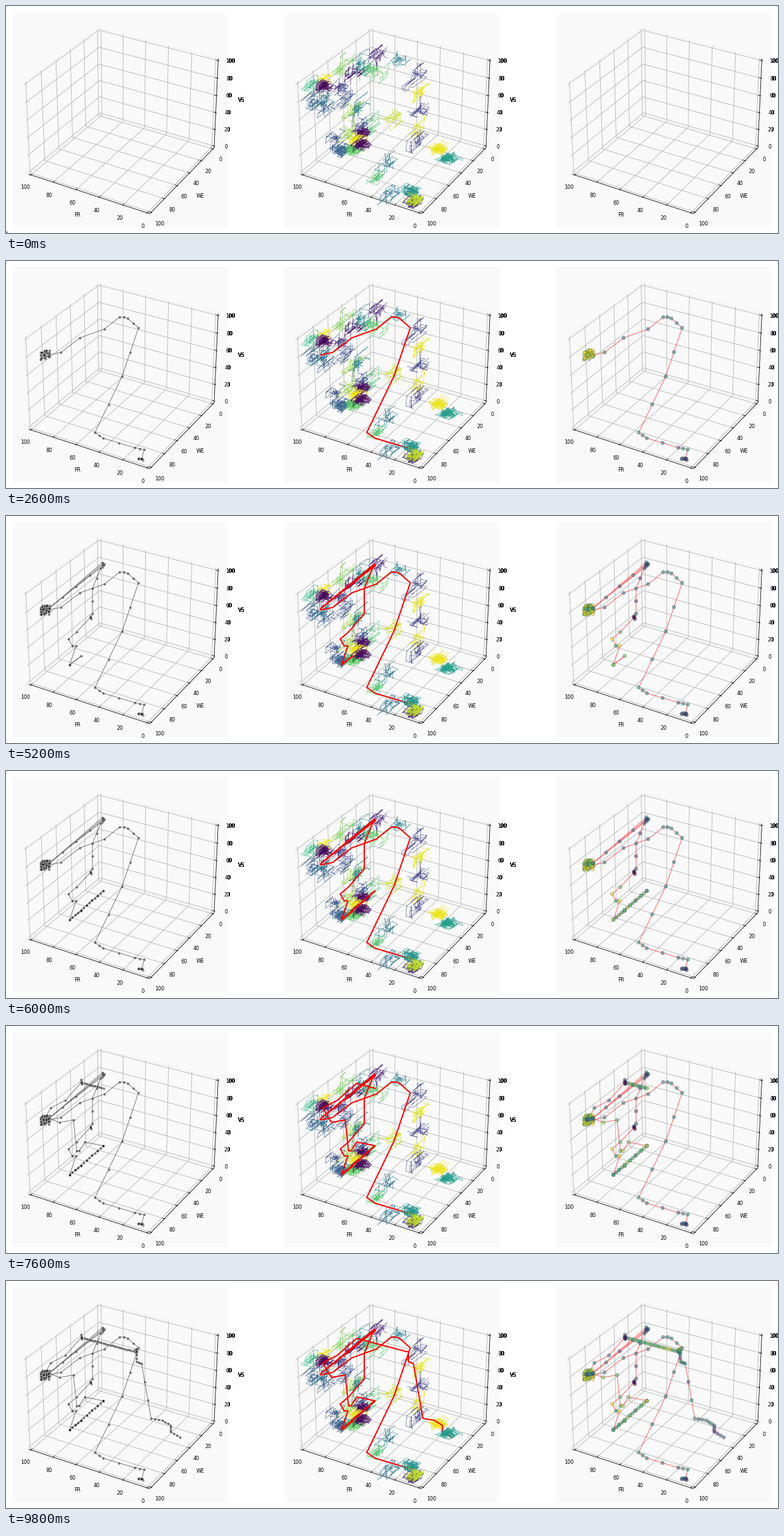
A matplotlib script that plays this animation: 1224 by 360 pixels, repeating every 10 s.

```python
from itertools import cycle

import numpy as np
import matplotlib.pyplot as plt
from matplotlib.animation import FuncAnimation
from matplotlib.collections import LineCollection
from matplotlib.transforms import Bbox, TransformedBbox

W, H, DPI = 1224, 360, 72
FRAMES = 50
PANELS = (0, 431, 862)
LO, HI = -2.083, 102.083
TICKS = range(0, 101, 20)

rng = np.random.default_rng(7)
viridis = plt.get_cmap("viridis")

fig = plt.figure(figsize=(W / DPI, H / DPI), dpi=DPI, facecolor="white")
ax = fig.add_axes((0, 0, 1, 1))
ax.set_xlim(0, W)
ax.set_ylim(H, 0)
ax.axis("off")


def project(fr, we, vs):
    """Perspective view of the cube (elevation 30, azimuth -60) in pixels."""
    a, b, c = (50 - fr) * 0.011429, (50 - we) * 0.011429, (vs - 50) * 0.008571
    depth = 10 - (0.433 * a - 0.75 * b + 0.5 * c)
    u = (0.866 * a + 0.5 * b) / depth
    v = (-0.25 * a + 0.433 * b + 0.866 * c) / depth
    return 185.6 + 1848.6 * u, 175.4 - 1848.6 * v


def polyline(*corners):
    return np.array([project(*c) for c in corners])


def add_lines(lines, dx, color, width, zorder):
    shifted = [line + (dx, 0) for line in lines]
    ax.add_collection(LineCollection(shifted, colors=color, linewidths=width,
                                     zorder=zorder))


def label(x, y, text, dx):
    """Text that turns heavy where it leaves the panel on the right."""
    style = dict(fontsize=8, ha="center", va="center_baseline", zorder=8,
                 clip_on=True)
    ax.text(x + dx, y - 1, text, **style)
    if x + 3 * len(text) > 352:
        outside = Bbox([[dx + 352, 0], [dx + 420, H]])
        for _ in range(6):
            copy = ax.text(x + dx, y - 1, text, **style)
            copy.set_clip_box(TransformedBbox(outside, ax.transData))


def draw_cube(dx):
    ax.add_patch(plt.Rectangle((dx + 10, 9.5), 342, 341.5, fc="#f9f9f9",
                               ec="none", zorder=0))
    panes = [
        polyline((HI, HI, LO), (HI, HI, HI), (HI, LO, HI), (HI, LO, LO), (HI, HI, LO)),
        polyline((HI, LO, HI), (LO, LO, HI), (LO, LO, LO), (HI, LO, LO)),
        polyline((HI, HI, LO), (LO, HI, LO), (LO, LO, LO)),
    ]
    add_lines(panes, dx, "#f2f2f2", 1, 1)

    grid, marks = [], []
    out, inn = 0.87, 1.74
    for t in TICKS:
        grid += [polyline((t, HI, LO), (t, LO, LO), (t, LO, HI)),
                 polyline((LO, t, LO), (HI, t, LO), (HI, t, HI)),
                 polyline((HI, HI, t), (HI, LO, t), (LO, LO, t))]
        marks += [polyline((t, HI + out, LO), (t, HI - inn, LO)),
                  polyline((LO - out, t, LO), (LO + inn, t, LO)),
                  polyline((LO - out, LO, t), (LO + inn, LO, t))]
    add_lines(grid, dx, "#b0b0b0", 0.8, 2)
    edges = [polyline((HI, HI, LO), (LO, HI, LO), (LO, LO, LO), (LO, LO, HI))]
    add_lines(edges + marks, dx, "black", 0.8, 2)

    for i, t in enumerate(TICKS):
        s = i / 5
        label(217 - 183 * s - 3.5 * s * s, 349 - 61 * s, str(t), dx)
        label(340 - 96 * s, 243 + 94 * s + 8 * s * s, str(t), dx)
        label(349.2 + 6.4 * s, 223 - 132.5 * s - 3 * s * s, str(t), dx)
    label(113, 332, "FR", dx)
    label(308, 302, "WE", dx)
    label(373.5, 150, "VS", dx)


def along(corners, per):
    """Points on a polyline, `per` of them to each of its sides."""
    corners = np.array(corners, float)
    s = np.linspace(0, len(corners) - 1, (len(corners) - 1) * per + 1)
    knots = np.arange(len(corners))
    return np.column_stack([np.interp(s, knots, c) for c in corners.T])


# Tangles of the middle panel sit along these trails: corners, points to a
# side and the colormap values they cycle through.
LOOSE = [
    ([(489, 126), (533, 101), (590, 80)], 2, (.65, .97, .8, .45, .1)),
    ([(487, 149), (508, 157), (552, 108), (590, 103)], 2,
     (.28, .4, .3, .2, .03, .68, .75)),
    ([(535, 150), (562, 187), (520, 211)], 2, (.25, .85)),
    ([(650, 112), (658, 168), (657, 212)], 2, (.2, .96)),
    ([(559, 158), (625, 84)], 1, (.43,)),
    ([(583, 190), (612, 180)], 1, (.72, .92)),
    ([(603, 249), (587, 272), (612, 296)], 1, (.38, .72)),
]
DENSE = [
    ([(503, 127)], 1, (.02,)),
    ([(530, 228), (551, 229)], 1, (.3, .75)),
    ([(565, 202), (556, 212), (565, 220)], 1, (.03, .97)),
    ([(687, 227), (701, 242)], 1, (.97, .55)),
    ([(641, 293), (646, 311), (648, 307)], 1, (.5, .1, .9)),
]
AXES_PX = np.array([(1.83, 0.58), (1.08, -0.9), (0.03, -1.33)])


def tangle(center, spread, steps):
    """Walk that mostly changes one cube coordinate at a time."""
    pos = rng.normal(0, spread)
    walk = []
    for axis in rng.choice(3, steps, p=(.25, .45, .3)):
        pos[axis] = rng.normal(0, spread[axis])
        walk.append((pos + rng.normal(0, 0.35, 3)) @ AXES_PX + center)
    return np.array(walk)


def draw_tangles(trails, spread, steps, walks):
    for corners, per, tones in trails:
        for center, tone in zip(along(corners, per), cycle(tones)):
            lines = [tangle(center, spread, steps) for _ in range(walks)]
            front = center[0] > 640 and center[1] > 235
            add_lines(lines, 0, [(*viridis(tone)[:3], 0.8)], 0.7,
                      5 if front else 3)


# Pieces of the journey, in pixels of the first panel: points, tone, moving.
def go(corners, per, tone):
    return along(corners, per), tone, True


def rest(center, n, tone, spread):
    drift = np.clip(rng.normal(0, 1, (n, 2)), -1.8, 1.8)
    return drift * spread + center, tone, False


def make_journey():
    camp, peak, low, high = (62, 149), (154, 76), (101, 236), (154, 190)
    return [
        rest((215, 314), 8, .35, (3, 1)),
        go([(219, 299), (204, 296), (154, 281), (141, 272), (184, 183),
            (210, 106), (193, 91)], 2, .45),
        go([(187, 89), (180, 89), (156, 108), (117, 122), (87, 145),
            (68, 149)], 1, .5),
        rest(camp, 49, .93, (4, 4)),
        go([(68, 147), peak], 4, .4),
        rest(peak, 5, .35, (1.5, 2.5)),
        go([(69, 146)], 1, .3),
        rest(camp, 5, .6, (4, 4)),
        go([(155, 78), (150, 83), (137, 115), (137, 155)], 2, .25),
        rest((134, 162), 4, .05, (1.5, 1.5)),
        go([(112, 184), (99, 195), (105, 206), (111, 206), low, (119, 222)], 1, .9),
        go([low, high], 12, .7),
        go([high, low], 6, .6),
        go([high, (125, 184), (116, 198), (112, 198), (107, 149), (85, 153)], 1, .8),
        rest(camp, 6, .4, (4, 4)),
        go([(71, 130), (94, 118)], 1, .3),
        rest((119.5, 89), 8, .08, (1, 2.5)),
        go([(125, 91), (204, 112)], 24, .7),
        rest((206, 111), 10, .65, (1.3, 1.8)),
        go([(207, 112), (207, 128), (215, 131), (230, 218), (248, 221),
            (261, 229), (261, 239), (276, 248)], 3, .4),
    ]


for panel in PANELS:
    draw_cube(panel)
draw_tangles(LOOSE, np.array([2.5, 5.6, 4.4]), 20, 3)
draw_tangles(DENSE, np.array([3.2, 3.5, 1.9]), 75, 3)

journey = make_journey()
path = np.vstack([points for points, _, _ in journey])
sizes = [len(points) for points, _, _ in journey]
moving = np.repeat([m for _, _, m in journey], sizes)
tones = np.repeat([t for _, t, _ in journey], sizes)
tones = np.clip(tones + rng.normal(0, 0.13, len(tones)), 0, 1)

gray_line, = ax.plot([], [], color="black", alpha=0.5, lw=1, zorder=4)
red_line, = ax.plot([], [], color="red", lw=2, zorder=4)
pale_line, = ax.plot([], [], color="red", alpha=0.5, lw=1.2, zorder=4)
gray_dots = ax.scatter([], [], s=19, c="black", alpha=0.45,
                       edgecolors="white", linewidths=0.7, zorder=5)
tone_dots = ax.scatter([], [], s=30, zorder=5)
tone_dots.set_facecolor(viridis(tones, alpha=0.55))
tone_dots.set_edgecolor((0.3, 0.3, 0.3, 0.45))
tone_dots.set_linewidth(0.8)


def update(frame):
    n = round(len(path) * frame / (FRAMES - 1))
    seen = path[:n]
    gray_line.set_data(*seen.T)
    gray_dots.set_offsets(seen)
    red_line.set_data(*(seen[moving[:n]] + (PANELS[1], 0)).T)
    right = seen + (PANELS[2], 0)
    pale_line.set_data(*right.T)
    tone_dots.set_offsets(right)
    return gray_line, gray_dots, red_line, pale_line, tone_dots


anim = FuncAnimation(fig, update, frames=FRAMES, interval=200, repeat=True,
                     repeat_delay=0, blit=False)
plt.show()
```
